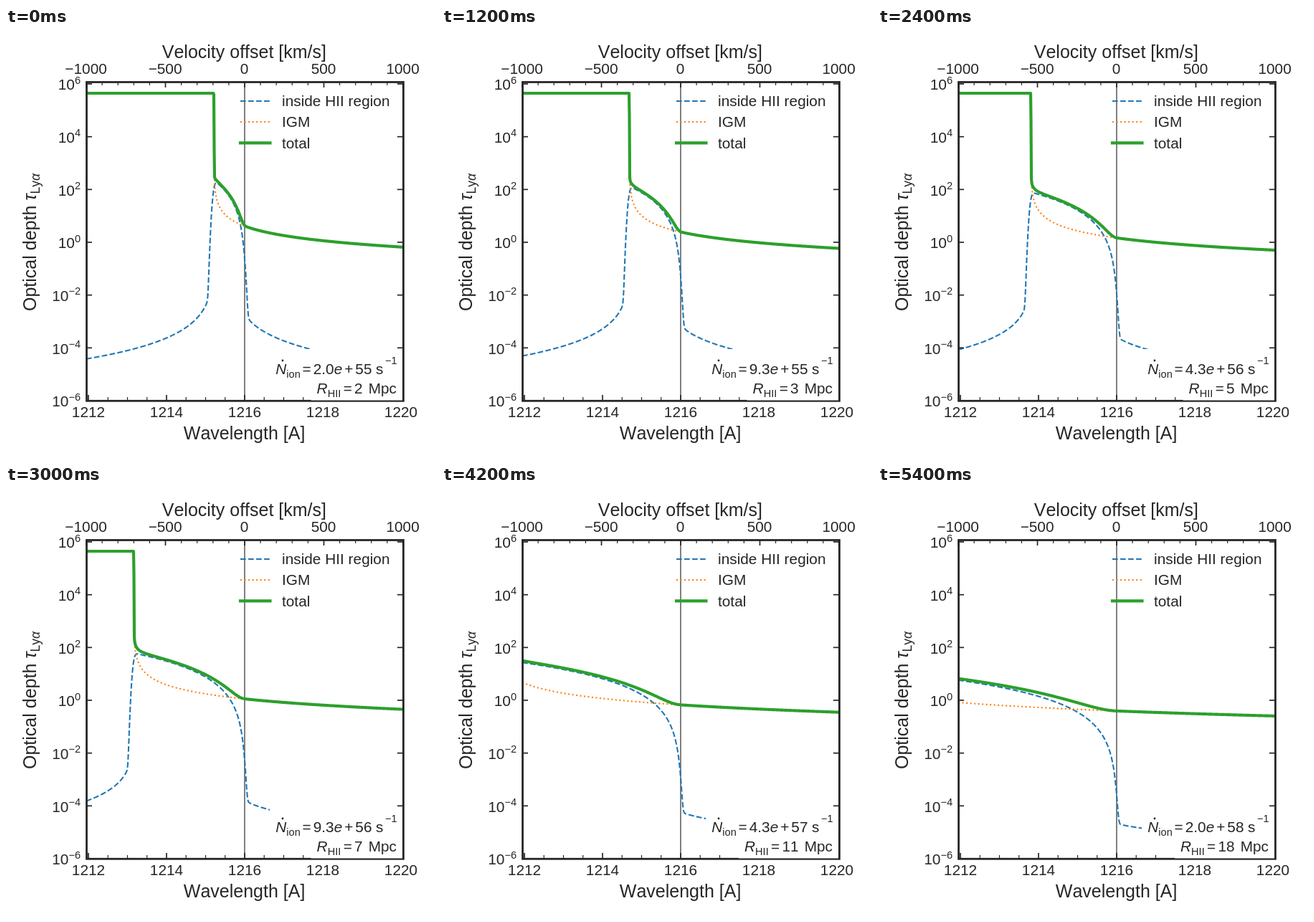
An HTML page that plays this animation: 600 by 600 pixels, repeating every 6 s.

```html
<!DOCTYPE html>
<html lang="en">
<head>
<meta charset="utf-8">
<title>Lyα optical depth</title>
<style>
  html, body { margin: 0; width: 100%; height: 100%; overflow: hidden; background: #fff; }
  svg { display: block; width: 100vw; height: 100vh; }
  text { font: 20.83px "Liberation Sans", Arial, sans-serif; font-kerning: none; fill: #262626; white-space: pre; }
  .big { font-size: 25px; }
  .small { font-size: 14.58px; }
  .sub { font-size: 17.5px; }
  .it { font-style: italic; }
  .mid { text-anchor: middle; }
  .end { text-anchor: end; }
  path, rect.frame { fill: none; }
  .inside { stroke: #1f77b4; stroke-width: 2.08; stroke-dasharray: 7.7 3.33; }
  .igm { stroke: #ff7f0e; stroke-width: 2.08; stroke-dasharray: 2.08 3.44; }
  .total { stroke: #2ca02c; stroke-width: 4.17; stroke-linecap: square; stroke-linejoin: round; }
  .tick, .frame { stroke: #262626; }
</style>
</head>
<body>
<svg viewBox="0 0 600 600">
  <clipPath id="plot"><rect x="112.5" y="75" width="442" height="445"/></clipPath>
  <g clip-path="url(#plot)">
    <path d="M333 75V520" stroke="#808080" stroke-width="2"/>
    <path id="inside" class="inside"/>
    <path id="igm" class="igm"/>
    <path id="total" class="total"/>
  </g>
  <g id="axes"></g>
  <rect class="frame" x="112.5" y="75.5" width="442" height="444.8" stroke-width="2.8"/>
  <text class="big mid" x="332.4" y="41.5">Velocity offset [km/s]</text>
  <text class="big mid" x="332.6" y="573.5">Wavelength [A]</text>
  <text class="big" transform="translate(42 395) rotate(-90)">Optical depth <tspan class="it">τ</tspan><tspan class="sub" dy="5">Ly</tspan><tspan class="sub it">α</tspan></text>

  <path class="inside" d="M327 102H369"/>
  <path class="igm" d="M327 131H369"/>
  <path class="total" d="M327 160.3H368.5"/>
  <text x="385" y="109">inside HII region</text>
  <text x="385" y="138">IGM</text>
  <text x="385" y="167.5">total</text>

  <rect x="368" y="448" width="185" height="50" fill="#fff"/>
  <rect id="box" y="486" height="33.5" fill="#fff"/>
  <circle cx="386" cy="464" r="1.4" fill="#262626"/>
  <text class="it" x="376.3" y="483.4">N</text>
  <text class="small" x="391.3" y="488">ion</text>
  <text x="413.5" y="483.4">=</text>
  <text x="428.7" y="483.4"><tspan id="mantissa"></tspan><tspan class="it">e</tspan></text>
  <text x="472.3" y="483.4">+</text>
  <text id="power" x="487.3" y="483.4"></text>
  <text x="516" y="483.4">s</text>
  <text class="small end" x="545.5" y="468.6">−1</text>
  <g id="lhs">
    <text class="it" x="433.5" y="510">R</text>
    <text class="small" x="448.7" y="515">HII</text>
    <text x="470.7" y="510">=</text>
  </g>
  <text id="radius" class="end" x="497.7" y="510"></text>
  <text class="end" x="545" y="510">Mpc</text>
</svg>
<script>
const $ = id => document.getElementById(id);
const X0 = 333, PX_KMS = 0.221, PX_A = 54.5, PX_DEX = 36.83, Y0 = 299;
const STEP = 600, STATES = 10;
const yOf = tau => Y0 - PX_DEX * Math.log10(tau);

function drawAxes() {
  let out = '';
  const tick = (x, y, dx, dy, w) =>
    out += `<path class="tick" d="M${x} ${y}l${dx} ${dy}" stroke-width="${w}"/>`;
  const label = (x, y, s, cls) => out += `<text class="${cls}" x="${x}" y="${y}">${s}</text>`;
  const minus = n => String(n).replace('-', '−');

  for (let v = -1000; v <= 1000; v += 100) {
    const x = X0 + v * PX_KMS, major = v % 500 === 0;
    tick(x, 75, 0, major ? 8 : 5, major ? 1.7 : 1.2);
    if (major) label(x - 0.4, 64, minus(v), 'mid');
  }
  for (let a = 1212; a <= 1220; a += 0.5) {
    const x = X0 + (a - 1216) * PX_A, major = a % 2 === 0;
    tick(x, 520, 0, major ? -8 : -5, major ? 1.7 : 1.2);
    if (major) label(x, 542.5, a, 'mid');
  }
  for (let p = -6; p <= 6; p += 2) {
    const y = Y0 - p * PX_DEX;
    tick(112, y, 8, 0, 1.7);
    tick(554, y, -8, 0, 1.7);
    label(104, y + 8.3, `10<tspan class="small" dy="-8.7">${minus(p)}</tspan>`, 'end');
  }
  $('axes').innerHTML = out;
}

// Ionised bubble: neutral fraction grows as u², seen through a Voigt profile.
const B = 12.85, WING = 0.00606 / Math.PI;
function tauInside(v, edge, k) {
  const n = Math.ceil(edge / 1.5), du = edge / n;
  let sum = 0;
  for (let i = 0; i < n; i++) {
    const u = (i + 0.5) * du, s = (v + u) / B, s2 = s * s;
    let phi = s2 < 30 ? Math.exp(-s2) / (B * Math.sqrt(Math.PI)) : 0;
    if (s2 > 1) phi += WING / (s2 * B * B);
    sum += u * u * phi;
  }
  return 0.0058 * 10 ** (-k / 3) * sum * du;
}

// Neutral gas beyond the bubble: saturated, then a damping wing.
function tauIgm(d) {
  const GP = 4.45e5, core = 1.2;
  if (d <= 0) return GP;
  return GP * Math.exp(-((d / core) ** 2)) + 805 / Math.max(d, core) - 0.019;
}

function curves(k) {
  const edge = 195 * 10 ** (k / 9), pts = { inside: [], igm: [], total: [] };
  for (let x = 112; x <= 555; x += 0.5) {
    const v = (x - X0) / PX_KMS;
    const a = tauInside(v, edge, k), b = tauIgm(v + edge);
    const add = (name, tau) => pts[name].push(x + ' ' + yOf(tau).toFixed(2));
    add('inside', a);
    add('igm', b);
    add('total', a + b);
  }
  return pts;
}

const cache = [];
let shown = -1;
function render(t) {
  const k = Math.floor(t / STEP) % STATES;
  if (k === shown) return;
  shown = k;
  const pts = cache[k] || (cache[k] = curves(k));
  for (const name in pts) $(name).setAttribute('d', 'M' + pts[name].join('L'));

  const [mantissa, power] = (10 ** (55.3 + k / 3)).toExponential(1).split('e+');
  $('mantissa').textContent = mantissa;
  $('power').textContent = power;

  const radius = Math.round(1.82 * 10 ** (k / 9));
  const shift = radius > 9 ? -11.6 : 0;
  $('radius').textContent = radius;
  $('lhs').setAttribute('transform', `translate(${shift} 0)`);
  $('box').setAttribute('x', 425.5 + shift);
  $('box').setAttribute('width', 127.5 - shift);
}

drawAxes();
const start = performance.now();
function loop() {
  render(performance.now() - start);
  requestAnimationFrame(loop);
}
loop();
</script>
</body>
</html>
```
